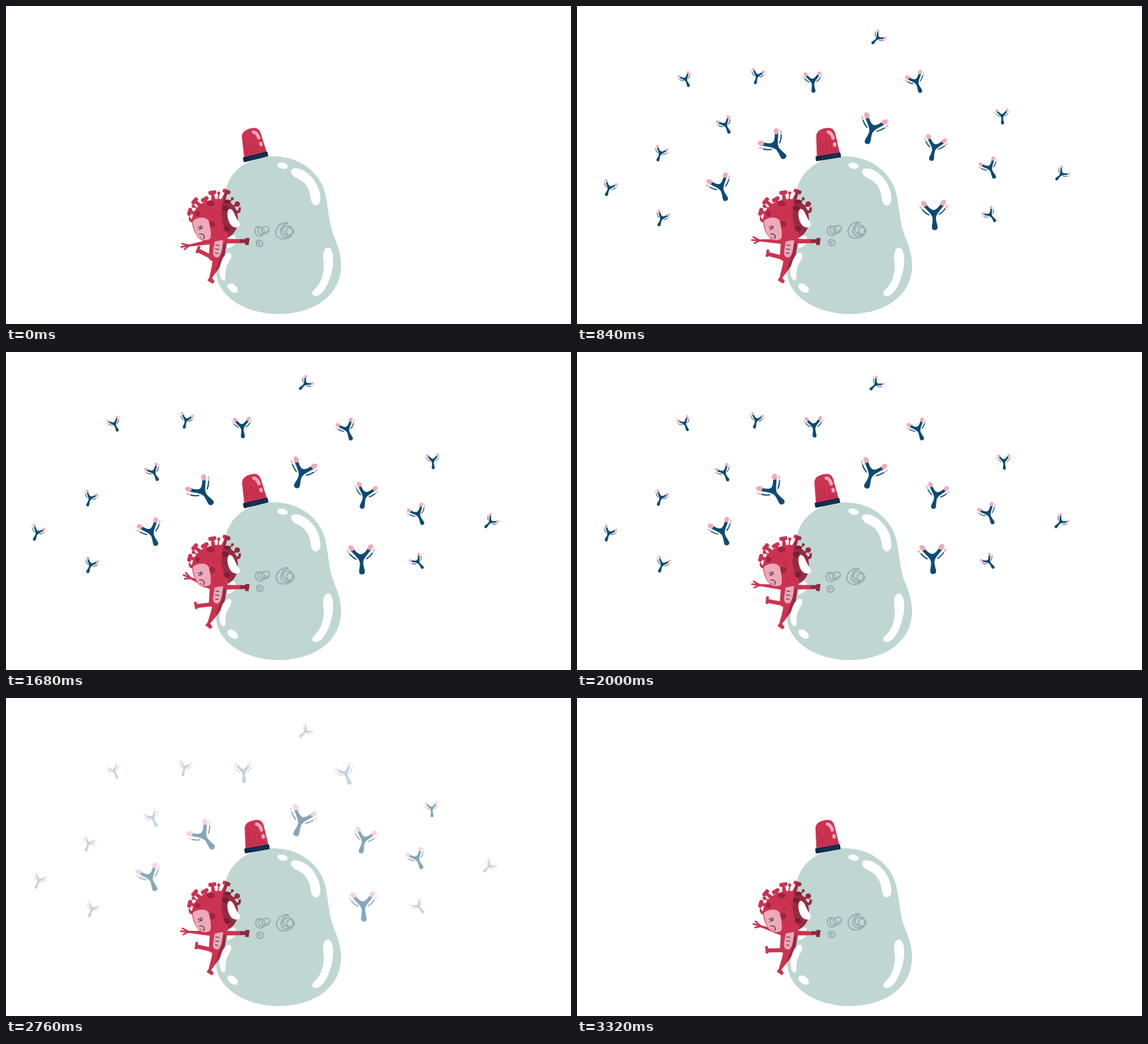
Recreate the animation shown at these times as an HTML page. Size 850x478 px, loop 3360 ms.

```html
<!DOCTYPE html>
<html lang="en">
<head>
<meta charset="utf-8">
<title>Virus and cell</title>
<style>
  html, body { margin: 0; width: 100%; height: 100%; overflow: hidden; background: #fff; }
  svg { display: block; width: 100vw; height: 100vh; }
  .red { fill: #cb3350; }
  .dark { fill: #a02441; }
  .deep { fill: #8f2740; }
  .pink { fill: #efa9b8; }
  .navy { fill: #0b2a47; }
  .white { fill: #fff; }
  .line { fill: none; stroke-linecap: round; stroke-linejoin: round; }
  .limb { fill: none; stroke: #cb3350; }
  .ink { stroke: #17304d; stroke-width: 1.2; }
  .cell { fill: #bfd6d2; mix-blend-mode: multiply; }
</style>
</head>
<body>
<svg viewBox="0 0 850 478">
  <defs>
    <g id="antibody">
      <path fill="#0d4a73" d="M-16 -13 L-12 -16.5 C-7 -9 -3 -6 0 -6 C3 -6 7 -9 12 -16.5 L16 -13
        C10 -5 4 -1 2.5 6 C2.5 13 4.5 17 4.300 21 C4 25.500 -4 25.500 -4.300 21 C-4.500 17 -2.500 13 -2.500 6 C-4 -1 -10 -5 -16 -13Z"/>
      <g id="armTip">
        <ellipse class="pink" cx="14.500" cy="-16" rx="3.800" ry="4.800" transform="rotate(42 14.500 -16)"/>
        <path class="line" stroke="#0d4a73" stroke-width="1.800" d="M8 1 Q13 -1.500 17 -7"/>
        <path class="line" stroke="#efa9b8" stroke-width="2.200" d="M18.500 -9 L20.500 -12"/>
      </g>
      <use href="#armTip" transform="scale(-1 1)"/>
    </g>
  </defs>

  <g id="near"></g>
  <g id="far"></g>

  <g id="virus">
    <g id="backLeg">
      <path class="limb" stroke-width="6" d="M314 379 L286 379.500"/>
      <path class="limb" stroke-width="4" d="M286 384 L285 373"/>
    </g>
    <g id="frontLeg">
      <path class="red" d="M311 375 L327 378 C324 391 316 400 310 409 L314 414 L311 417.500 L303 412.500 L306 408 C308 398 311 388 311 375Z"/>
    </g>
    <g id="wave">
      <path class="red" d="M313 350 L313 358 L274 355.500 L274 352.500Z"/>
      <path class="line" stroke="#cb3350" stroke-width="2.500" d="M275 354 L265 349.500 M275 354 L263 354 M275 354 L267 358.500"/>
    </g>
    <path class="red" d="M307 350 L333 349 L328 382 C320 387 308 385 305 379Z"/>
    <path class="pink" d="M314 353 L326.500 352 C326 362 324 377 318 378 C311 378 311 372 312 366Z"/>
    <path class="line ink" d="M315.500 359 l5 1 M315 365 l5 1 M315 371 l4 1"/>
    <g id="spikes" class="red"></g>
    <path class="red" d="M275 316 C274 325 279 327 286 324 L284 316 C280 321 278 321 277 317Z
      M353 302 C355 311 349 314 343 310 L345 305 C348 309 350 308 350 303Z"/>
    <path class="red" d="M280 322 C280 302 300 290 320 290 C340 290 350 305 349 324 C348 341 336 350 322 352
      C308 357 295 355 289 348 C283 340 280 332 280 322Z"/>
    <g class="dark">
      <ellipse cx="308" cy="297" rx="6" ry="4"/>
      <ellipse cx="310" cy="328" rx="5" ry="5"/>
      <ellipse cx="330" cy="304" rx="5" ry="4"/>
      <ellipse cx="288" cy="312" rx="3" ry="4"/>
      <ellipse cx="332" cy="335" rx="5" ry="4"/>
      <ellipse cx="333" cy="294" rx="5" ry="3"/>
    </g>
    <g id="speckles" class="dark"></g>
    <path class="pink" d="M281 323 C288 317 301 316 305 323 C307 332 310 343 307 350 C300 354 292 352 288 346 C283 338 281 328 281 323Z"/>
    <path class="line ink" d="M289 332 L295 334 L290 336 M292.500 330.500 l3 1.500 M291 343 C297 341 300 346 297 350"/>
    <circle cx="293" cy="348" r="1.300" fill="#d87087"/>
  </g>

  <path class="cell" d="M331 275 C337 248 365 226 402 226 C446 226 475 254 481 285 C486 312 486 326 493 345
    C500 362 504 374 504 390 C504 436 462 463 410 463 C358 463 316 434 316 398 C317 386 325 376 326 362
    C326 354 336 350 334 342 C326 334 323 318 325 305 C326 292 328 284 331 275Z"/>

  <g class="white">
    <ellipse cx="416" cy="240" rx="8" ry="4.500" transform="rotate(12 416 240)"/>
    <path d="M434 244 C452 243 473 266 473 290 C473 302 461 303 459 292 C457 276 453 266 438 259 C427 254 426 245 434 244Z"/>
    <path d="M485 363 C493 365 494 385 490 400 C486 416 478 434 467 436 C459 436 459 430 465 425 C474 417 479 401 478 387 C476 375 477 363 485 363Z"/>
    <path d="M336 371 C342 373 338 381 334 387 C329 396 331 402 330 409 C329 415 324 413 322 406 C319 392 327 370 336 371Z"/>
    <ellipse cx="341" cy="424" rx="9" ry="5.500" transform="rotate(38 341 424)"/>
    <path d="M337 305 C343 306 344 316 350 324 C355 331 350 335 342 332 C333 328 330 305 337 305Z"/>
    <path d="M336 347 C341 343 346 345 346 350 C347 358 342 362 333 364 L334 349Z"/>
  </g>
  <path class="red" d="M330 350 L353 350.500 L353 356.500 L329 357Z"/>
  <path class="deep" d="M352 350.500 L360 350.500 L360.500 348.500 L366.500 349 L365 359.500 L359.500 359 L359.500 356 L352 356.500Z"/>

  <g id="scribbles" class="line" stroke="#97adb0" stroke-width="1.900">
    <path d="M383 331 C375 330 373 340 379 344 C386 348 392 340 388 334 C384 328 377 334 381 340 C386 345 397 341 397 334
      C396 328 385 330 385 336 C386 342 393 342 394 337"/>
    <path d="M377 354 C380 349 388 352 387 357 C385 363 376 361 378 356 C380 353 384 355 382 358"/>
    <path d="M424 325 C411 324 404 337 408 344 C412 351 422 350 427 347"/>
    <path d="M425 326 C416 326 411 339 416 344 C422 349 433 345 432 336 C430 327 418 328 417 336 C417 343 427 346 433 341
      C436 335 428 330 424 334 C420 339 425 347 431 345"/>
  </g>

  <g id="siren">
    <path class="red" d="M-17 -3 L-13 -33 C-12 -41 -5 -43.500 3 -43.500 C11 -43.500 15 -41 16 -33 L18 -3Z"/>
    <path class="line" stroke="#a02441" stroke-width=".8" stroke-dasharray="3 2.500" d="M-11 -8 L-9 -27 M-6 -7 L-5 -22 M0 -7 L0 -25 M6 -7 L5 -20 M12 -6 L11 -12"/>
    <path class="line" stroke="#efa9b8" stroke-width="5" d="M6 -37 Q11 -35 11.500 -27"/>
    <ellipse class="pink" cx="12.500" cy="-17" rx="2.600" ry="3.600"/>
    <rect class="navy" x="-19" y="-4" width="38" height="7.500" rx="1"/>
    <path stroke="#35577a" stroke-width="4" stroke-dasharray=".8 3" d="M-9 0 H17"/>
  </g>
</svg>

<script>
const LOOP = 3360, LIMB_PERIOD = 383, SIREN_PERIOD = 243, FADE = 320;
const $ = id => document.getElementById(id);
const clamp = v => Math.max(0, Math.min(1, v));
const cycle = (t, period) => Math.cos(2 * Math.PI * t / period);

let seed = 71;
const random = () => (seed = seed * 16807 % 2147483647) / 2147483647;

function add(parent, tag, attrs) {
  const el = document.createElementNS('http://www.w3.org/2000/svg', tag);
  for (const key in attrs) el.setAttribute(key, attrs[key]);
  return parent.appendChild(el);
}

function place(el, x, y, angle = 0, scale = 1) {
  el.setAttribute('transform', `translate(${x} ${y}) rotate(${angle}) scale(${scale})`);
}

// Slow drift around a resting point
function wander(reach) {
  const period = 2000 + 1500 * random(), px = random() * period, py = random() * period;
  return t => [reach * cycle(t + px, period), reach * cycle(t + py, period)];
}

// Resting places: x, y, angle, scale
const places = {
  near: [
    [444, 183, 20, 1], [297, 209, -38, 1], [539, 214, 14, .85], [641, 165, -3, .52],
    [217, 271, -22, .9], [620, 243, -25, .7], [536, 311, -3, 1]
  ],
  far: [
    [451, 49, 46, .5], [163, 109, -24, .5], [270, 104, 14, .52], [356, 112, -4, .7],
    [512, 115, -22, .72], [222, 180, -26, .58], [125, 220, 20, .52], [728, 254, 44, .5],
    [48, 273, 22, .53], [128, 319, 22, .53], [621, 314, -38, .52]
  ]
};
const antibodies = Object.entries(places).flatMap(([group, rows]) => rows.map(row =>
  ({ row, drift: wander(1.5), el: add($(group), 'use', { href: '#antibody' }) })));

function fade(group, t, start, end) {
  $(group).setAttribute('opacity', Math.min(clamp((t - start) / FADE), clamp((end - t) / FADE)));
}

// Spikes stand on the head at an angle and a distance from its centre
function spike(angle, reach) {
  return add($('spikes'), 'g', { transform: `translate(316 320) rotate(${angle}) translate(0 ${-reach})` });
}
for (const [angle, reach] of [[-75, 41], [-50, 42], [-30, 34], [-8, 40], [21, 44]]) {
  const g = spike(angle, reach);
  add(g, 'rect', { x: -6, y: -3, width: 12, height: 6, rx: 2.2 });
  add(g, 'path', { d: 'M-2 1 H2 L3.500 15 H-3.500Z' });
}
for (const [angle, r] of [[-61, 2.6], [6, 2.4], [39, 2.2], [55, 4]]) {
  const g = spike(angle, 39);
  add(g, 'circle', { r });
  add(g, 'path', { d: 'M0 0 V11', stroke: '#cb3350', 'stroke-width': r * .8 });
}

for (let i = 0; i < 48; i++) {
  const a = random() * 2 * Math.PI, d = Math.sqrt(random());
  add($('speckles'), 'circle', { cx: 316 + 30 * d * Math.cos(a), cy: 320 + 27 * d * Math.sin(a), r: .4 + random() * .5 });
}

const scribbleDrift = wander(1);

function spin(id, angle, x, y) {
  $(id).setAttribute('transform', `rotate(${angle} ${x} ${y})`);
}

function draw(t) {
  fade('near', t, 40, 2920);
  fade('far', t, 120, 2840);
  for (const { row: [x, y, angle, scale], drift, el } of antibodies) {
    const [dx, dy] = drift(t);
    place(el, x + dx, y + dy, angle, scale);
  }

  const swing = cycle(t, LIMB_PERIOD);
  spin('wave', 9 - 19 * swing, 310, 354);
  spin('backLeg', 9 + 19 * swing, 312, 379);
  spin('frontLeg', 3 - 3 * swing, 320, 378);

  const shake = cycle(t, SIREN_PERIOD);
  place($('siren'), 376.8 - 1.3 * shake, 227, -11.5 - 2.4 * shake);
  place($('scribbles'), ...scribbleDrift(t));
}

const start = performance.now();
function tick() {
  draw((performance.now() - start) % LOOP);
  requestAnimationFrame(tick);
}
tick();
</script>
</body>
</html>
```
